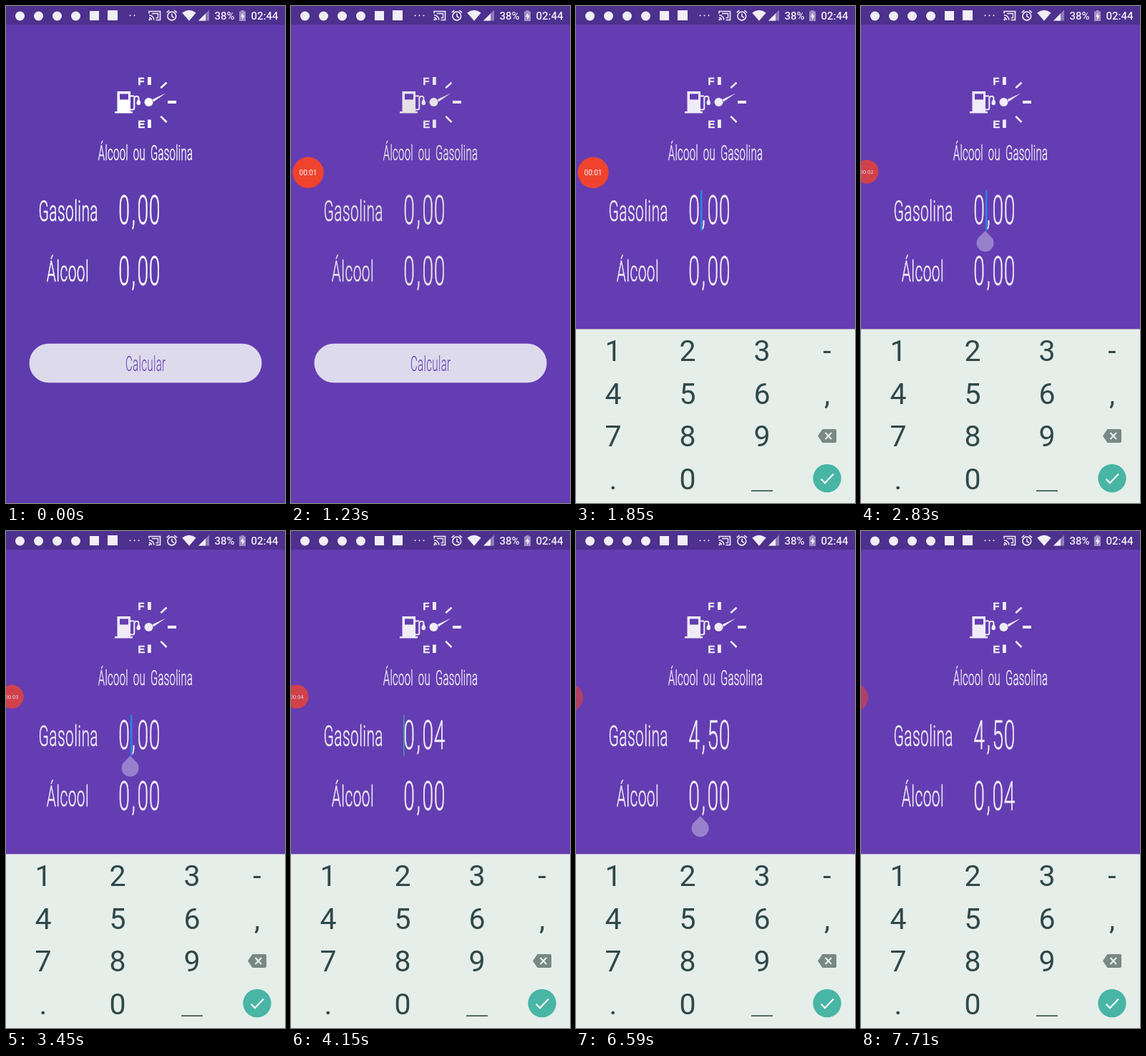
Animation, 390 px wide and 693 px high, one loop 8000 ms. Source, as an HTML page:

```html
<!DOCTYPE html>
<html lang="pt">
<head>
<meta charset="utf-8">
<title>Álcool ou Gasolina</title>
<style>
html, body { margin: 0; width: 100%; height: 100%; overflow: hidden; background: #633cb1; }
svg { display: block; width: 100vw; height: 100vh; }
text { font-family: Roboto, "Liberation Sans", sans-serif; }
.thin { font-weight: 300; letter-spacing: .02em; word-spacing: .2em; }
.mid { text-anchor: middle; }
.status { font-size: 15px; font-weight: 500; }
.key { font-size: 41px; fill: #30484a; text-anchor: middle; }
.gauge { font: bold 15px "Liberation Sans", Arial, sans-serif; stroke: currentColor; stroke-width: .5; }
</style>
</head>
<body>
<svg viewBox="0 0 390 693" xmlns="http://www.w3.org/2000/svg">
  <rect id="bg" width="390" height="693"/>
  <rect width="390" height="26" fill="#4e308f"/>

  <g id="status" fill="#f1eef6">
    <g id="chats"></g>
    <rect x="117" y="7" width="13" height="13"/>
    <rect x="142" y="6" width="14" height="14"/>
    <g id="dots"></g>
    <g fill="none" stroke="#f1eef6" stroke-width="1.6">
      <path d="M200 10.5V7.5H215.5V19.5H209.5M200 12.8A6.8 6.8 0 0 1 206.8 19.6M200 16.2A3.5 3.5 0 0 1 203.4 19.6"/>
      <path d="M204 10.5H212.5V16.5H209.5" stroke-width="1.3"/>
      <circle cx="231.8" cy="14" r="5.9"/>
      <path d="M232 10.5V14.5L235 16.4M224.7 9.2L228.4 6.2M235.2 6.2L239 9.2"/>
    </g>
    <circle cx="200.6" cy="19" r="1.2"/>
    <path d="M246.2 9.4Q256 2.2 265.6 9.4L256 20.8Z"/>
    <path d="M284 5.5V20.5H269Z" opacity=".4"/>
    <path d="M279 10.5V20.5H269Z"/>
    <text class="status" x="291.5" y="19">38%</text>
    <path d="M328.5 6H332.5V7.6H335V21H326V7.6H328.5Z" opacity=".5"/>
    <path d="M331.5 9L327.8 15H330.2V19.4L333.8 13.2H331.5Z"/>
    <text class="status" x="342.5" y="19">02:44</text>
  </g>

  <g id="ink">
    <path fill-rule="evenodd" d="M155.5 119H174V147H177V149.5H152V147H155.5ZM159 122.5V130.5H171V122.5Z"/>
    <path d="M173.5 144.5H177Q179.3 144.5 179.3 142V129Q179.3 126 182 126H183.5Q185.5 126 185.5 129.5M174 125.5H179" fill="none" stroke="currentColor" stroke-width="2"/>
    <path d="M185.4 128.5Q188.5 133.5 188 136A2.8 2.8 0 0 1 182.5 136Q182.2 133.5 185.4 128.5Z"/>
    <circle cx="199.5" cy="134" r="6"/>
    <path d="M204.8 130.2L223.5 121.5L206.2 133.4Z"/>
    <path d="M216.3 114.2L224.5 106.8M216.3 153.8L224.5 162" stroke="currentColor" stroke-width="2.6"/>
    <rect x="226" y="132" width="12" height="4"/>
    <rect x="198" y="99" width="4.8" height="11"/>
    <rect x="198" y="158.5" width="4.8" height="11.5"/>
    <text class="gauge" x="184.2" y="110">F</text>
    <text class="gauge" x="184.2" y="169.8">E</text>
    <g id="words" stroke="currentColor" stroke-width=".6"></g>
  </g>

  <rect x="32.5" y="470.7" width="325" height="54.6" rx="27.3" fill="#dddaec"/>
  <g id="button" fill="#633cb1"></g>

  <rect id="cursor" width="2.4" height="57"/>
  <path id="handle" d="M0 0L8.5 8.5A12 12 0 1 1 -8.5 8.5Z" fill="#9880cc"/>

  <g id="keyboard">
    <rect y="450.5" width="390" height="243" fill="#e6eeea"/>
    <g id="keys"></g>
    <rect x="245" y="675" width="30" height="2" fill="#536a69"/>
    <path d="M338 599.5L344.5 590H362Q364 590 364 592V607Q364 609 362 609H344.5Z" fill="#788884"/>
    <path d="M348.5 595L357 604M357 595L348.5 604" stroke="#e6eeea" stroke-width="2.2"/>
    <circle cx="351" cy="658.5" r="19.7" fill="#48b5a5"/>
    <path d="M342.5 659.5L348 665L360 652.5" fill="none" stroke="#f2faf7" stroke-width="2.3"/>
  </g>

  <g id="bubble">
    <circle r="21.7" fill="#f0432d"/>
    <text id="clock" class="mid" y="3.6" font-size="10" fill="#fff"></text>
  </g>
</svg>
<script>
const LOOP = 8000;
const NARROW = 0.505;
const $ = id => document.getElementById(id);

function add(parent, tag, attrs, text) {
  const el = document.createElementNS("http://www.w3.org/2000/svg", tag);
  for (const name in attrs) el.setAttribute(name, attrs[name]);
  if (text) el.textContent = text;
  return $(parent).appendChild(el);
}

function set(id, attrs) {
  for (const name in attrs) $(id).setAttribute(name, attrs[name]);
}

// All lettering of the app shares one condensed style.
function narrow(parent, text, x, y, size, cls = "thin mid", extra = {}) {
  return add(parent, "text", {
    class: cls, "font-size": size,
    transform: `translate(${x} ${y}) scale(${NARROW} 1)`, ...extra
  }, text);
}

[19.5, 45.5, 71.5, 97.5].forEach(x => add("chats", "circle", { cx: x, cy: 14, r: 6.5 }));
const dots = [173.5, 179.5, 185.5].map(x => add("dots", "circle", { cx: x, cy: 13.3, r: 1 }));

narrow("words", "Álcool ou Gasolina", 195, 215, 29.5);
narrow("words", "Gasolina", 87.3, 299.5, 41.5);
narrow("words", "Álcool", 86.5, 384, 41.5);
narrow("button", "Calcular", 195.2, 509, 30);

const commaGap = { dx: "0 4 4" };
const gas = narrow("words", "0,00", 157.3, 304, 56, "thin", commaGap);
const alcohol = narrow("words", "0,00", 157.3, 388.5, 56, "thin", commaGap);

["123-", "456,", "789", ".0"].forEach((row, r) =>
  [...row].forEach((label, c) =>
    add("keys", "text", { class: "key", x: [52, 156, 260, 351][c], y: Math.round(495 + r * 59.5) }, label)));

const clamp = v => Math.max(0, Math.min(1, v));
const progress = (t, a, b) => clamp((t - a) / (b - a));
const easeOut = p => 1 - (1 - p) ** 3;
const easeBoth = p => p * p * (3 - 2 * p);
const mix = (a, b, p) => a + (b - a) * p;
const blend = (a, b, p) => `rgb(${a.map((v, i) => Math.round(mix(v, b[i], p)))})`;
const within = (t, spans) => spans.some(([a, b]) => t >= a && t < b);

// Latest value whose start time has passed.
const latest = (t, steps) => steps.filter(([at]) => t >= at).pop()[1];

const WHITE = [255, 255, 255], GREY = [229, 226, 230], PALE = [240, 236, 247];
const CURSOR_ON = [
  [1400, 1980], [2400, 2890], [3390, 4270], [4350, 5500],
  [5880, 6370], [6840, 7700]
];

function drawCursor(t) {
  const onAlcohol = t >= 5880;
  const atStart = onAlcohol ? t >= 7260 : t >= 3700;
  set("cursor", {
    x: atStart ? 157 : 174,
    y: onAlcohol ? 341 : 256.5,
    width: atStart ? 1.5 : 2.4,
    fill: atStart ? "#36a69b" : "#2b86e4",
    opacity: within(t, CURSOR_ON) ? 1 : 0
  });
  set("handle", {
    transform: onAlcohol ? "translate(173.6 397.5)" : "translate(173.6 313.5)",
    opacity: within(t, [[2080, 3700], [6370, 7260]]) ? 1 : 0
  });
}

function drawBubble(t) {
  const dock = easeBoth(progress(t, 2200, 2750));
  const hide = easeBoth(progress(t, 4300, 4700));
  const x = mix(mix(24, 8, dock), -9.7, hide);
  const y = mix(mix(232.3, 231, dock), 232.3, hide);
  const size = mix(mix(1, 0.765, dock), 0.91, hide);
  const shown = progress(t, 80, 500) * mix(mix(1, 0.78, dock), 0.55, hide);
  set("bubble", { transform: `translate(${x} ${y}) scale(${size})`, opacity: shown });
  set("clock", { opacity: 1 - hide });
  $("clock").textContent = "00:0" + Math.floor((t + 40) / 1000);
}

function draw(t) {
  const settle = progress(t, 60, 630);
  const ink = t < 1400 ? blend(WHITE, GREY, settle) : blend(GREY, PALE, progress(t, 1400, 1700));
  set("ink", { fill: ink, color: ink });
  set("bg", { fill: blend([95, 60, 174], [100, 61, 178], settle) });
  dots[2].setAttribute("opacity", t < 300 ? 0 : 1);

  gas.textContent = latest(t, [[0, "0,00"], [3700, "0,04"], [4380, "0,45"], [4930, "4,50"]]);
  alcohol.textContent = latest(t, [[0, "0,00"], [7260, "0,04"]]);

  const rise = easeOut(progress(t, 1350, 1680));
  set("keyboard", { transform: `translate(0 ${mix(243, 0, rise)})` });
  drawCursor(t);
  drawBubble(t);
}

const start = performance.now();
function tick() {
  draw((performance.now() - start) % LOOP);
  requestAnimationFrame(tick);
}
tick();
</script>
</body>
</html>
```
